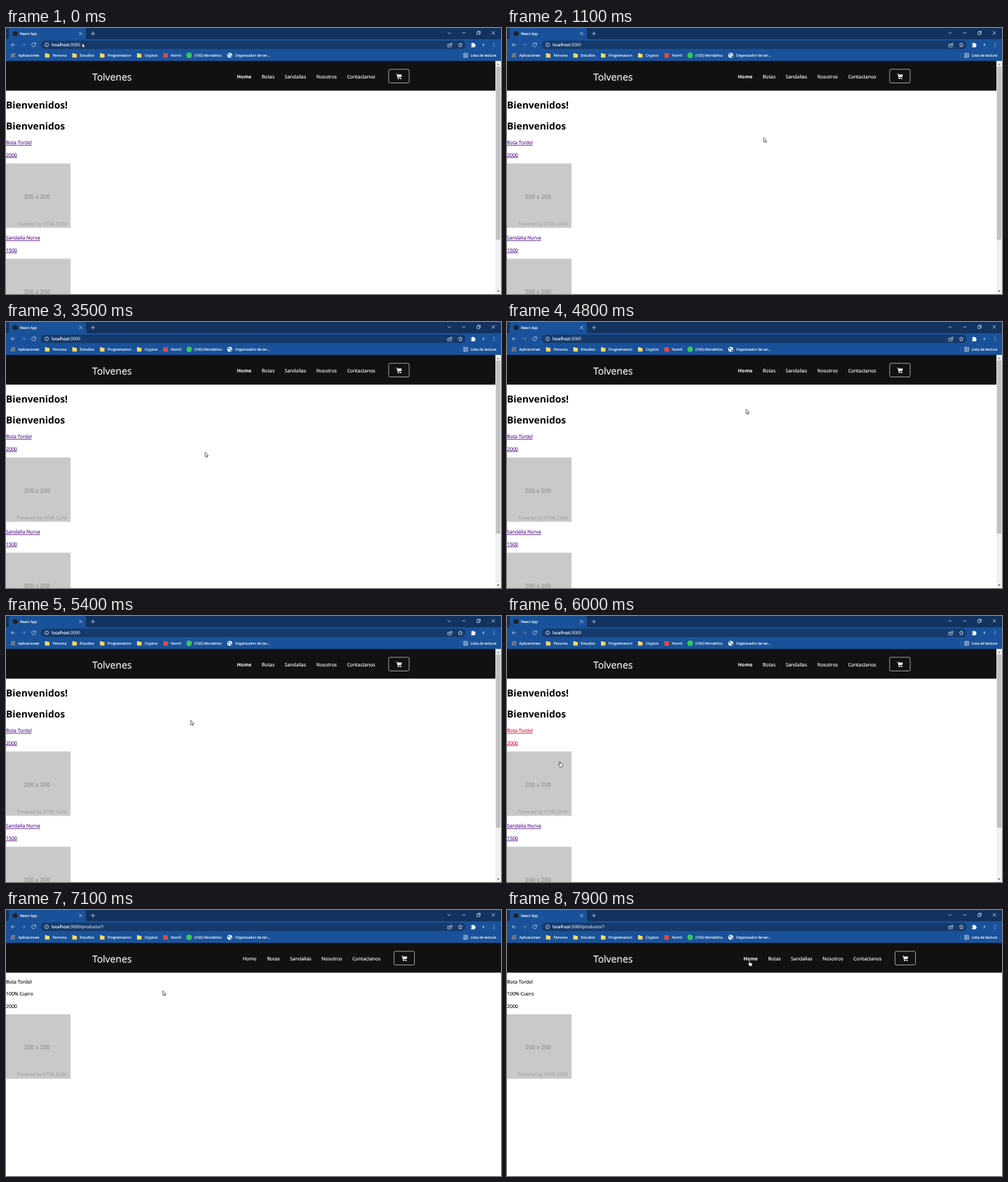
These frames come from a looping animation (706x380 px, 8 s). An HTML page:

```html
<!DOCTYPE html>
<html lang="es">
<head>
<meta charset="utf-8">
<title>React App</title>
<style>
  html, body { margin: 0; width: 100%; height: 100%; overflow: hidden; background: #fff; }
  svg { display: block; width: 706px; height: 380px; }
  text {
    font-family: "Open Sans", "Noto Sans", sans-serif; text-rendering: geometricPrecision;
    fill: currentColor; stroke: currentColor; stroke-width: .14;
  }
  .bold { font-weight: 700; stroke: none; }
  .mid { text-anchor: middle; }
  .size { font-family: Roboto, sans-serif; }
  .link { text-decoration: underline .6px; }
  .line { fill: none; stroke: #dde6f2; stroke-width: .7; }
</style>
</head>
<body>
<svg id="stage" viewBox="0 0 706 380"></svg>
<script>
const BODY = 6.9, SMALL = 5.2;   // font sizes of page and browser
const BLUE = '#19529a';

const text = (x, y, str, size = BODY, color = '#fff', cls = '', id = '') =>
  `<text x="${x}" y="${y}" font-size="${size}" color="${color}" class="${cls}" id="${id}">${str}</text>`;
const rect = (x, y, w, h, fill, more = '') =>
  `<rect x="${x}" y="${y}" width="${w}" height="${h}" fill="${fill}" ${more}/>`;
const dot = (x, y, r, fill) => `<circle cx="${x}" cy="${y}" r="${r}" fill="${fill}"/>`;
const shape = (d, fill = '#fff') => `<path d="${d}" fill="${fill}"/>`;
const line = d => `<path class="line" d="${d}"/>`;
const group = (id, ...parts) => `<g id="${id}">${parts.join('')}</g>`;
const at = (x, y, part) => `<g transform="translate(${x} ${y})">${part}</g>`;
const $ = id => document.getElementById(id);

// icons are drawn around their own centre
const apps = [0, 1, 2, 3, 4, 5, 6, 7, 8].map(i => {
  const col = i % 3, row = (i - col) / 3;
  return rect(col * 2.2 - 2.9, row * 2.2 - 2.9, 1.4, 1.4, ['#ea6a5e', '#8fc6a0', '#f0c85a'][(col + row) % 3]);
}).join('');
const folder = shape('M-3.2-3h2.6l.8.9h3v5.4h-6.4z', '#ffd868');
const globe = dot(0, 0, 3.5, '#fff') + shape('M-2.6-1.6l1.6-.8 1 1.2-1.4 1.6zM.2 1l2-1 .6 1.2L1 3z', BLUE);
const cross = line('M-2.3-2.3l4.6 4.6m0-4.6l-4.6 4.6');
const plus = line('M-2.8 0h5.6M0-2.8v5.6');
const arrowLeft = line('M2.8 0h-5.4M0-2.6L-2.6 0L0 2.6');
const arrowRight = '<g opacity=".4" transform="scale(-1 1)">' + arrowLeft + '</g>';
const reload = line('M2.4-1.6a2.8 2.8 0 1 0 .4 2.2M2.8-2.9v2.1h-2.1');
const info = line('M2.7 0a2.7 2.7 0 1 1-5.4 0a2.7 2.7 0 1 1 5.4 0M0-.4v2M0-1.8v.6');
const share = line('M-1.2-1H-3v4h5.2V1.6M-1.2 1q.4-2.6 3-2.6v-1.3l2 2-2 2V-.2q-2 0-3 1.2z');
const star = line('M0-3l.9 2.1 2.2.2-1.7 1.5.5 2.2L0 1.8-1.9 3l.5-2.2-1.7-1.5 2.2-.2z');
const puzzle = shape('M-2.6-2H-1a1.1 1.1 0 1 1 2.2 0h1.6v1.7a1.1 1.1 0 1 1 0 2.2v1.5h-5.4V1.8a1.1 1.1 0 1 0 0-2.2z');
const cart = shape('M-4-3.5h1.9l.3 1h6l-.8 3.6h-4.6l.2.8h4.2v.8h-5l-1.1-5.4H-4z') +
  dot(-.8, 3.4, .8, '#fff') + dot(2.6, 3.4, .8, '#fff');

const bookmarks = [
  [apps, 'Aplicaciones'], [folder, 'Parvona'], [folder, 'Estudios'], [folder, 'Programacion'],
  [folder, 'Cryptos'], [rect(-3.2, -3, 6.4, 6.4, '#e04a3f'), 'Nomil'],
  [dot(0, 0, 3.9, '#35c759'), '(150) MondaVoz'], [globe, 'Organizador de tar...']
].map(([icon, name]) => `<g>${at(3.2, 39, icon)}${text(10.8, 41, name, SMALL)}</g>`);

const browser = [
  rect(0, 0, 706, 16, '#12335f'), rect(0, 16, 706, 31, BLUE),
  shape('M2 16q2 0 2-2V3q0-3 3-3h104q3 0 3 3v11q0 2 2 2z', BLUE),
  dot(13, 8, 3.6, '#20232a'), text(20, 10, 'React App', SMALL),
  at(106.5, 8, cross), at(124, 8, plus),
  at(632, 7, line('M-2.3-1L0 1.3 2.3-1')), at(653, 7, line('M-2.5 0h5')),
  at(674, 7, line('M-2.4-1.2h3.6v3.6h-3.6zM-1.2-1.2v-1.2h3.6v3.6H1.2')), at(695, 7, cross),
  at(10, 24, arrowLeft), at(25, 24, arrowRight), at(39.5, 24, reload),
  rect(49.5, 18, 606, 12, '#153a6b', 'rx="6"'), at(58, 24, info),
  text(65, 26.3, 'localhost<tspan opacity=".8">:3000<tspan id="path"></tspan></tspan>', 6.05),
  at(633, 24, share), at(648, 24, star), at(666, 24, puzzle),
  dot(681, 24, 4, '#14569c'), text(681, 25.7, 'F', 4.6, '#fff', 'mid'),
  [-2.2, 0, 2.2].map(dy => dot(696, 24 + dy, .6, '#dde6f2')).join(''),
  group('bookmarks', ...bookmarks),
  rect(647, 35.5, .5, 7, '#4b7ab5'),
  at(655.5, 39, line('M-2.8-2.8h5.6v5.8h-5.6zM-1-2.8V3M-1-.8h3.8M-1 1.1h3.8')),
  text(662.5, 41, 'Lista de lectura', SMALL)
].join('');

const navbar = rect(0, 47, 706, 42.5, '#111') + text(123, 75, 'Tolvenes', 13.9) +
  group('menu',
    text(339.8, 72, 'Home', BODY, '#fff', 'mid', 'home'),
    group('links', ...['Botas', 'Sandalias', 'Nosotros', 'Contactanos'].map(s => `<g>${text(0, 72, s)}</g>`)),
    rect(545.8, 59, 29.2, 19.5, 'none', 'rx="2" stroke="#ddd" stroke-width=".7"'),
    at(560.4, 69, cart));

const placeholder = y => rect(0, y, 92, 92, '#c9c9c9') +
  text(44.3, y + 50, '200 x 200', 8.5, '#929292', 'mid size') +
  text(15.5, y + 88, 'Powered by HTML.COM', 6.5, '#a6a6a6');

const heading = (y, s) => text(0, y, s, 13.8, '#000', 'bold');
const para = (y, s) => text(0, y, s, BODY, '#111');
const card = (id, y, name, price) => group(id,
  text(0, y, name, BODY, 'inherit', 'link'), text(0, y + 17.4, price, BODY, 'inherit', 'link'),
  placeholder(y + 27.2));

const list = group('list',
  heading(115.2, 'Bienvenidos!'), heading(144.7, 'Bienvenidos'),
  card('first', 166.3, 'Bota Tordel', '2000'),
  card('second', 302.4, 'Sandalia Nurva', '1500'));

const scrollbar = group('scrollbar',
  rect(698, 47, 8, 333, '#f1f1f1'), rect(698.8, 55, 6.4, 247.5, '#c1c1c1'),
  shape('M700.2 52.8l1.8-2 1.8 2z', '#777'), shape('M700.2 375l1.8 2 1.8-2z', '#505050'));

const detail = group('detail',
  para(105, 'Bota Tordel'), para(122.4, '100% Cuero'), para(139.6, '2000'), placeholder(149));

const pointer = '<g id="pointer" fill="#fff" stroke="#111" stroke-width=".6" stroke-linejoin="round">' +
  '<path id="arrow" d="M0 0V6.6L1.5 5.2L2.5 7.5L3.6 7L2.6 4.8H4.6Z"/>' +
  '<path id="hand" d="M-.6 .5Q0-.4 .7 .5V3.2L3.6 3.8Q4.2 4 4.1 4.8L3.6 7V8.2H-.2V7.2L-2.3 4.8Q-2.2 3.9-1.3 4.3L-.6 5Z"/></g>';

$('stage').innerHTML = list + detail + navbar + scrollbar + browser + pointer;

// set the children of a row side by side
function layRow(id, x, gap) {
  for (const item of $(id).children) {
    item.setAttribute('transform', `translate(${x})`);
    const label = item.querySelector('text');
    x += label.x.baseVal[0].value + label.getComputedTextLength() + gap;
  }
}
layRow('bookmarks', 6.7, 8.2);
layRow('links', 364.8, 14.5);

// pointer strokes: when, where to, and the bend of a curved one
const strokes = [
  { from: 0, to: 400, end: [220, 113] },
  { from: 500, to: 900, end: [366, 156.5] },
  { from: 1100, to: 1400, end: [486, 180] },
  { from: 1500, to: 2200, end: [662, 173.5], bend: [800, 45] },
  { from: 2700, to: 2800, end: [397, 170] },
  { from: 3100, to: 3500, end: [284, 186] },
  { from: 4100, to: 4300, end: [179, 140] },
  { from: 4300, to: 4800, end: [341, 124.5], bend: [250, 10] },
  { from: 4800, to: 5000, end: [393, 97] },
  { from: 5000, to: 5800, end: [134, 201] },
  { from: 5900, to: 6000, end: [75.3, 207.5] },
  { from: 6000, to: 6100, end: [72.5, 207] },
  { from: 6500, to: 7200, end: [249, 100] },
  { from: 7400, to: 7900, end: [345.7, 72], bend: [630, 75] }
];

function pointerAt(t) {
  let pos = [108.5, 21.5];
  for (const { from, to, end, bend } of strokes) {
    if (t <= from) break;
    const k = Math.min(1, (t - from) / (to - from));
    pos = pos.map((p, i) => {
      const mid = bend ? bend[i] : (p + end[i]) / 2;
      return (1 - k) ** 2 * p + 2 * k * (1 - k) * mid + k * k * end[i];
    });
  }
  return pos;
}

const show = (id, on) => $(id).setAttribute('display', on ? 'inline' : 'none');

function draw(now) {
  // the screen refreshes ten times a second
  const t = Math.floor(now % 8000 / 100) * 100;
  const opened = t >= 6100, overCard = t === 6000, overHome = t === 7900;
  show('list', !opened);
  show('scrollbar', !opened);
  show('detail', opened);
  show('hand', overCard || overHome);
  show('arrow', !overCard && !overHome);
  $('path').textContent = opened ? '/producto/1' : '';
  $('menu').setAttribute('transform', `translate(${opened ? 7.6 : 0})`);
  $('home').classList.toggle('bold', !opened || overHome);
  $('first').style.color = overCard ? '#dc143c' : '#551a8b';
  $('second').style.color = '#551a8b';
  $('pointer').setAttribute('transform', `translate(${pointerAt(t)})`);
}

const start = performance.now();
function tick() {
  draw(performance.now() - start);
  requestAnimationFrame(tick);
}
tick();
</script>
</body>
</html>
```
